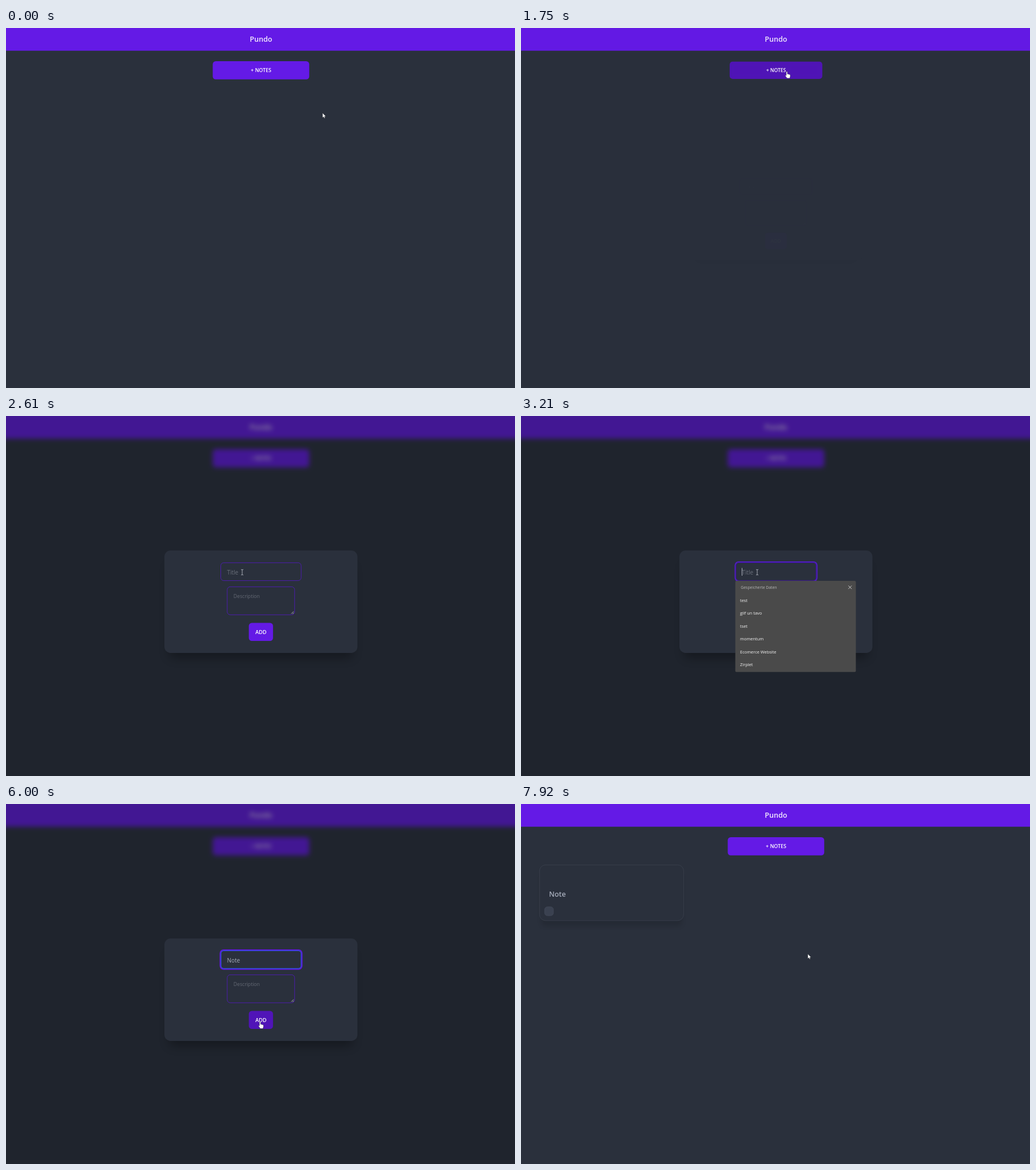
An HTML page that plays this animation: 890x629 px, repeating every 7.99 s.

```html
<!DOCTYPE html>
<html lang="en">
<head>
<meta charset="utf-8">
<title>Notes</title>
<style>
  html, body { margin: 0; width: 100%; height: 100%; overflow: hidden; background: #2a303c; }
  svg { display: block; width: 890px; height: 629px; font-family: "Open Sans", "Noto Sans", sans-serif; }
  text { white-space: pre; }
  .mid { text-anchor: middle; }
  .semi { font-weight: 600; fill: #fff; }
  .field { fill: #2a303c; stroke: #511bb9; stroke-width: .9; }
  .hint { fill: #646974; }
  .list { font-size: 7.45px; fill: #f4f4f4; }
</style>
</head>
<body>
<svg viewBox="0 0 890 629">
  <defs>
    <filter id="blur" filterUnits="userSpaceOnUse" x="-40" y="-40" width="970" height="709" color-interpolation-filters="sRGB">
      <feGaussianBlur stdDeviation="4"/>
    </filter>
    <filter id="boxShade" x="-20%" y="-30%" width="140%" height="160%"><feGaussianBlur stdDeviation="8.3"/></filter>
    <filter id="cardShade" x="-20%" y="-40%" width="140%" height="180%"><feGaussianBlur stdDeviation="4.2"/></filter>
  </defs>

  <g id="page">
    <rect x="-60" y="-60" width="1010" height="749" fill="#2a303c"/>
    <rect x="-60" y="-60" width="1010" height="99.7" fill="#641ae6"/>
    <text class="mid semi" x="445.9" y="24.3" font-size="12.6" fill-opacity=".93">Pundo</text>
    <g id="newBtn">
      <rect id="newFace" x="361.5" y="58" width="168.7" height="31.7" rx="5.3"/>
      <text class="mid semi" x="446" y="77.4" font-size="8.9">+ NOTES</text>
    </g>
    <g id="card">
      <rect x="35.5" y="122.5" width="246" height="91" rx="8" opacity=".13" filter="url(#cardShade)"/>
      <rect x="32.4" y="106.4" width="252" height="97.4" rx="10.7" fill="#2a303c" stroke="#3b424f" stroke-width=".8"/>
      <text x="49" y="162.3" font-size="12.4" font-weight="600" fill="#a6adbb">Note</text>
      <rect x="41.3" y="179.7" width="15.4" height="15.4" rx="5" fill="#3a4150" stroke="#474e5d" stroke-width=".7"/>
    </g>
  </g>

  <g id="veil">
    <use href="#page" filter="url(#blur)"/>
    <rect width="890" height="629" fill="#111318" opacity=".4"/>
  </g>

  <g id="modal">
    <rect x="285" y="260" width="321.5" height="163" rx="8" opacity=".3" filter="url(#boxShade)"/>
    <rect x="277" y="235" width="337.5" height="179" rx="10.7" fill="#2a303c"/>
    <rect class="field" x="375.5" y="256.4" width="140.6" height="31.2" rx="5.3"/>
    <g id="ring" fill="none">
      <rect id="ringOut" x="374.6" y="255" width="142.8" height="33.6" rx="5.8" stroke-width="2.2"/>
      <rect id="ringIn" x="376" y="256.4" width="140" height="30.9" rx="4.8"/>
    </g>
    <text id="title" x="386.5" y="276.8" font-size="10"></text>
    <rect id="caret" y="265.5" width=".9" height="13.5" fill="#c3c8d2"/>
    <rect class="field" x="386.8" y="298.4" width="117.9" height="48.9" rx="5.3"/>
    <text class="hint" x="397.8" y="317.8" font-size="8.65">Description</text>
    <path d="M498.8 345.6 503 341.4M501.2 345.8 503.2 343.8" stroke="#c9ccd2" stroke-width=".8"/>
    <g id="addBtn">
      <rect id="addFace" x="424.6" y="361.5" width="42.3" height="31.6" rx="5.3"/>
      <text class="mid semi" x="445.8" y="381" font-size="9.3">ADD</text>
    </g>
  </g>

  <g id="menu">
    <rect x="374.7" y="288" width="210.8" height="159.3" rx="2" fill="#4a4a4a"/>
    <text x="384.3" y="301.8" font-size="6.85" fill="#b9b9b9">Gespeicherte Daten</text>
    <path d="M572.4 296.4l5.8 5.8m0-5.8l-5.8 5.8" stroke="#d8d8d8" stroke-width=".9"/>
    <g id="items" class="list"></g>
  </g>

  <g id="cursor">
    <path id="arrow" d="M0 0V8.3L1.9 6.6 3.1 9.2 4.5 8.6 3.3 6.1H5.8Z" fill="#fff" stroke="#15181e" stroke-width=".4"/>
    <path id="hand" d="M-1 .9a1 1 0 0 1 2 0V4.5c.6-.3 1.4-.2 1.7.3 .6-.3 1.3-.2 1.7.4 .8-.2 1.6.2 1.6 1.2V8.5c0 1.5-.9 2-.9 3.3H.2C0 10.5-2.4 8.3-2.9 7c0-.8 1.1-.9 1.9.2Z" fill="#fff" stroke="#15181e" stroke-width=".4"/>
    <path id="beam" d="M-2-4.8Q0-4.8 0-3.8V3.8Q0 4.8-2 4.8M2-4.8Q0-4.8 0-3.8M0 3.8Q0 4.8 2 4.8" fill="none" stroke="#c6cad2" stroke-width=".8"/>
  </g>
</svg>

<script>
const LOOP = 7990, START = 550, TICK = 66.43;
const $ = id => document.getElementById(id);
const show = (id, on) => $(id).style.display = on ? '' : 'none';
const fade = (id, value) => { $(id).style.opacity = value; show(id, value > 0); };
const smooth = p => p * p * (3 - 2 * p);
const linear = p => p;

$('items').innerHTML = ['test', 'gilf un tavo', 'tset', 'momentum', 'Ecomerce Website', 'Zirplet']
  .map((s, i) => `<text x="383" y="${325 + 22.4 * i}">${s}</text>`).join('');

// Value at tick k along [tick, value] points, held at both ends.
function track(k, points, ease = linear) {
  let [k0, v0] = points[0];
  if (k <= k0) return v0;
  for (const [k1, v1] of points) {
    if (k < k1) return v0 + (v1 - v0) * ease((k - k0) / (k1 - k0));
    [k0, v0] = [k1, v1];
  }
  return v0;
}

const mix = (a, b, p) => `rgb(${a.map((v, i) => Math.round(v + (b[i] - v) * p))})`;
const PRIMARY = [100, 26, 230], HOVER = [80, 20, 184];

const PATH_X = [[-1, 553.5], [8, 464.8], [21, 464.8], [31, 413], [74, 413], [82, 444.2], [100, 444.2], [111, 501.5]];
const PATH_Y = [[-1, 148.5], [8, 76], [21, 76], [24, 180], [28, 263], [31, 273], [74, 273], [82, 380.5], [100, 380.5], [111, 262]];
const SHAPES = [[-1, 'arrow'], [5, 'hand'], [22, 'arrow'], [28, 'beam'], [76, 'arrow'], [81, 'hand'], [90, 'arrow']];
const TYPED = [[-1, ''], [55, 'N'], [59, 'No'], [63, 'Not'], [67, 'Note']];
const CARET = [[-1, 0], [39, 1], [47, 0], [55, 1], [75, 0], [83, 1]];

// Latest entry of a hard-change list.
const latest = (k, list) => list.filter(([at]) => at <= k).pop()[1];

function scaleAt(id, s, x, y) {
  $(id).setAttribute('transform', `translate(${x} ${y}) scale(${s}) translate(${-x} ${-y})`);
}

function draw(t) {
  const k = Math.max(-1, Math.floor((t - START + 12) / TICK));

  scaleAt('newBtn', track(k, [[15, 1], [17, .96], [18, .96], [19, 1]]), 446, 74);
  $('newFace').setAttribute('fill', mix(PRIMARY, HOVER, track(k, [[4, 0], [7, 1], [19, 1], [22, 0]])));
  show('card', k >= 91);

  const open = k >= 90 ? 0 : track(k, [[17, 0], [18, .02], [19, .5], [20, .89], [21, 1]]);
  fade('veil', open);
  fade('modal', open);
  scaleAt('modal', .9 + .1 * open, 445.75, 324.5);

  const typed = latest(k, TYPED);
  const title = $('title');
  title.textContent = typed || 'Title';
  title.setAttribute('fill', typed ? '#a6adbb' : '#6a707b');
  show('caret', latest(k, CARET));
  if (open) $('caret').setAttribute('x', typed ? 386.5 + title.getComputedTextLength() : 386.1);

  const lit = track(k, [[39, 0], [40, .3], [41, 1]]);
  show('ring', k >= 39);
  $('ringOut').setAttribute('stroke', mix([76, 31, 184], [92, 26, 214], lit));
  $('ringIn').setAttribute('stroke', mix([50, 26, 120], [37, 99, 235], lit > .5 ? 1 : 0));

  fade('menu', track(k, [[38, 0], [39, .5], [40, 1], [55, 1], [58, 0]]));

  scaleAt('addBtn', k === 89 ? .96 : 1, 445.75, 377.3);
  $('addFace').setAttribute('fill', mix(PRIMARY, HOVER, track(k, [[79, 0], [82, 1]])));

  const shape = latest(k, SHAPES);
  for (const id of ['arrow', 'hand', 'beam']) show(id, id === shape);
  const ease = k > 8 && k < 40 ? linear : smooth;
  $('cursor').setAttribute('transform', `translate(${track(k, PATH_X, ease)} ${track(k, PATH_Y, ease)})`);
}

const born = performance.now();
function loop() {
  draw((performance.now() - born) % LOOP);
  requestAnimationFrame(loop);
}
loop();
</script>
</body>
</html>
```
